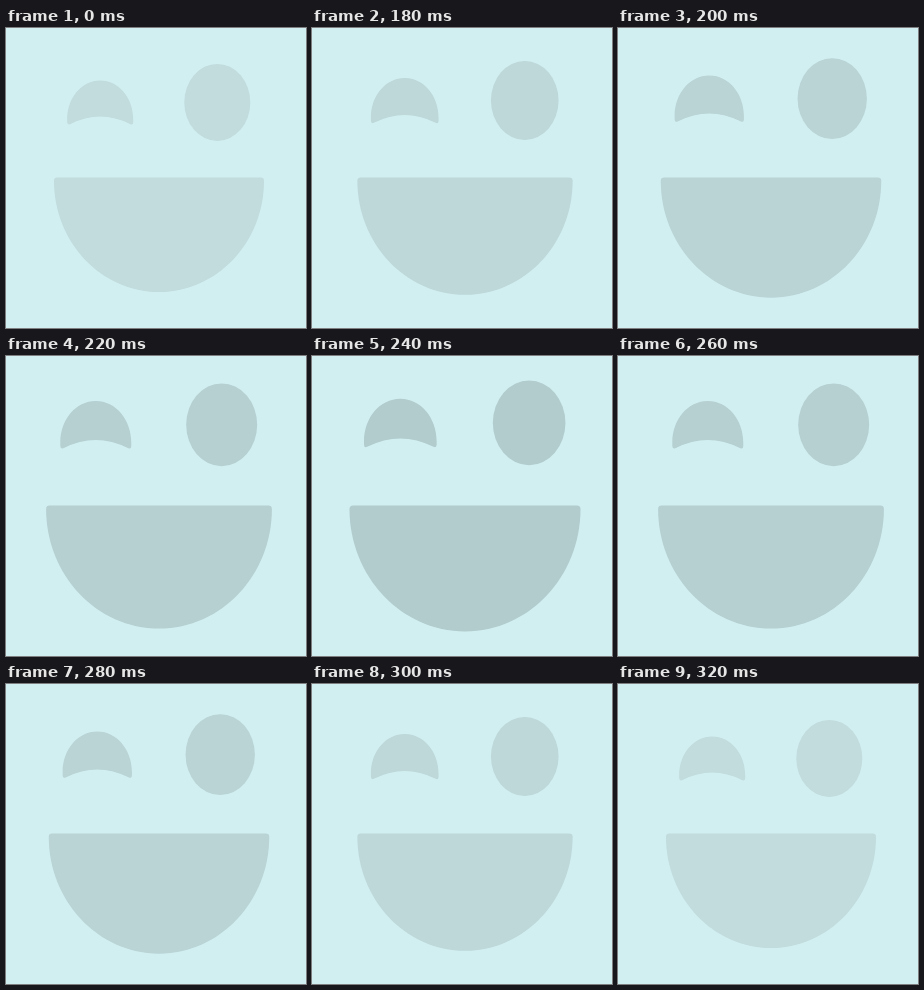
An HTML page for the animation above (500 ms loop, 300x300 px).

```html
<!DOCTYPE html>
<html lang="en">
<head>
<meta charset="utf-8">
<title>Winking smile</title>
<style>
  html, body { margin: 0; width: 100%; height: 100%; overflow: hidden; background: #d1eff0; }
  svg { display: block; width: 100%; height: 100%; }
</style>
</head>
<body>
<svg viewBox="0 0 300 300">
  <g id="face">
    <path d="M61.2 94 V91 C61.2 70 75.5 52.4 94.2 52.4 S127.2 70 127.2 91 V94.3 Q127.2 97.2 124.4 96.2 Q109 88.6 94.2 88.6 T64 96.2 Q61.2 97.2 61.2 94 Z"/>
    <ellipse cx="211.3" cy="74.4" rx="33" ry="38.5"/>
    <path d="M51.2 149.5 H254.8 Q258 149.5 258 152.7 C258 214 211 264 153 264 S48 214 48 152.7 Q48 149.5 51.2 149.5 Z"/>
  </g>
</svg>
<script>
  const face = document.getElementById('face');
  const LOOP = 500, START = 160, STEP = 20, PEAK = 4;
  const PIVOT = [153, 149.5];
  const REST = [194, 219, 221], BEAT = [178, 203, 205];

  // Stepped triangle pulse: 0 at rest, 1 at the peak of the beat
  function pulse(ms) {
    const step = Math.floor((ms - START) / STEP);
    return Math.max(0, 1 - Math.abs(step - PEAK) / PEAK);
  }

  function draw(ms) {
    const k = pulse(ms % LOOP);
    const [x, y] = PIVOT;
    const rgb = REST.map((c, i) => Math.round(c + (BEAT[i] - c) * k));
    face.setAttribute('transform', `translate(${x} ${y}) scale(${1 + 0.1 * k}) translate(${-x} ${-y})`);
    face.setAttribute('fill', `rgb(${rgb})`);
  }

  const begin = performance.now();
  function tick() {
    draw(performance.now() - begin);
    requestAnimationFrame(tick);
  }
  tick();
</script>
</body>
</html>
```
